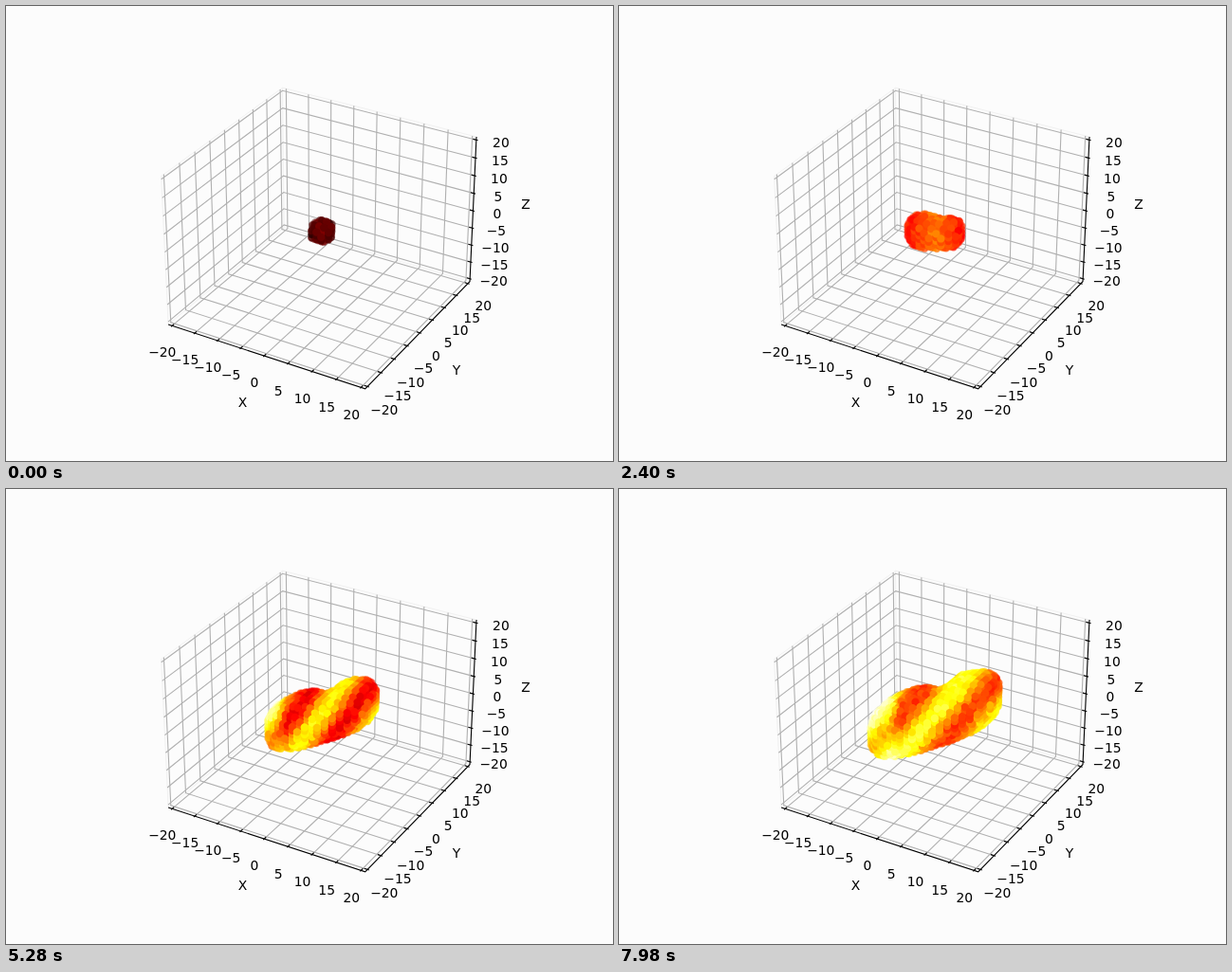
An HTML page with a canvas that plays this animation: 640 by 480 pixels, repeating every 8 s.

```html
<!DOCTYPE html>
<html lang="en">
<head>
<meta charset="utf-8">
<title>Pulsating voxel cloud</title>
<style>
  html, body { margin: 0; width: 100%; height: 100%; overflow: hidden; background: #fcfcfc; }
  svg, canvas { position: absolute; left: 0; top: 0; width: 640px; height: 480px; }
  text { font: 13.89px "DejaVu Sans", sans-serif; text-anchor: middle; }
</style>
</head>
<body>
<svg id="axes" viewBox="0 0 640 480"></svg>
<canvas id="cloud" width="640" height="480"></canvas>
<script>
const LOOP = 8000, STEP = 30, PULSE = 2430, EDGE = 125 / 6;
const CX = 333, CY = 237.4, FOCAL = 1997.8;

const mix = (a, b, u) => a + (b - a) * u;
const clamp = v => Math.max(0, Math.min(1, v));
const hash = (x, y, z) => {
  const s = Math.sin(x * 12.99 + y * 78.23 + z * 37.72) * 43758.55;
  return s - Math.floor(s);
};

// Perspective view: elevation 30, azimuth -60, box aspect 4:4:3
function project(x, y, z) {
  const X = x / 35, Y = y / 35, Z = z * 3 / 140;
  const c = Math.sqrt(3) / 2;
  const right = c * X + Y / 2;
  const up = -X / 4 + c / 2 * Y + c * Z;
  const near = c / 2 * X - 0.75 * Y + Z / 2;
  const k = FOCAL / (10 - near);
  return [CX + k * right, CY - k * up, near * FOCAL / 10];
}

function drawAxes() {
  const E = EDGE, IN = E - 0.67, OUT = E + 0.33, PAD = E + 3.4;
  const out = [];
  const line = (pts, color, width = 1.11) => {
    const d = pts.map(p => project(...p).slice(0, 2).map(v => v.toFixed(2)).join(",")).join(" ");
    out.push(`<polyline points="${d}" fill="none" stroke="${color}" stroke-width="${width}"/>`);
  };
  const text = (s, x, y) => out.push(`<text x="${x.toFixed(1)}" y="${Math.round(y)}">${s}</text>`);
  const label = (v, ...at) => {
    const [x, y] = project(...at);
    text(v < 0 ? "\u2212" + -v : v, x, y + 11.25);
  };
  const ticks = Array.from({ length: 9 }, (_, i) => i * 5 - 20);

  line([[-E, E, E], [E, E, E], [E, E, -E], [-E, E, -E], [-E, E, E], [-E, -E, E], [-E, -E, -E], [-E, E, -E]], "#f1f1f1", 1);
  for (const v of ticks) {
    line([[v, E, E], [v, E, -E], [v, -E, -E]], "#b0b0b0");
    line([[E, v, -E], [-E, v, -E], [-E, v, E]], "#b0b0b0");
    line([[-E, -E, v], [-E, E, v], [E, E, v]], "#b0b0b0");
  }
  line([[-E, -E, -E], [E, -E, -E], [E, E, -E], [E, E, E]], "#000");
  for (const v of ticks) {
    line([[v, -IN, -E], [v, -OUT, -E]], "#000");
    line([[IN, v, -E], [OUT, v, -E]], "#000");
    line([[IN, E, v], [OUT, E, v]], "#000");
    label(v, v, -PAD, -PAD);
    label(v, PAD, v, -PAD);
    label(v, PAD, PAD, v);
  }
  text("X", 249.5, 423);
  text("Y", 475, 389);
  text("Z", 548, 214);
  document.getElementById("axes").innerHTML = out.join("");
}

// Integer lattice, sorted back to front
const grid = [];
for (let x = -14; x <= 14; x++)
  for (let y = -14; y <= 14; y++)
    for (let z = -13; z <= 13; z++) {
      const [px, py, near] = project(x, y, z);
      if (Math.hypot(px - CX, py - CY, near) > 95) continue;
      grid.push({ px, py, near, tint: .09 * (hash(x, y, z) - .5) });
    }
grid.sort((a, b) => a.near - b.near);

function hot(v, alpha) {
  const ch = u => Math.round(255 * clamp(u));
  return `rgba(${ch(.0416 + v / .381)},${ch((v - .365) / .381)},${ch((v - .746) / .254)},${alpha.toFixed(3)})`;
}

// Swelling body: wide and rising first, then tall and falling, with a standing heat wave
function bodyAt(t) {
  const age = t / LOOP, phase = 2 * Math.PI * (t % PULSE) / PULSE;
  const swell = Math.sin(phase / 2), lean = Math.sin(phase);
  const born = clamp(t / 300), grow = .95 + .08 * age;
  return {
    rx: mix(12.5, (30 + 28 * swell + 15 * lean) * grow, born),
    ry: mix(12, (14 + 26 * Math.sqrt(swell) - 4 * lean) * grow, born),
    lean,
    notch: .28 * clamp(t / 3000),
    base: .4 + .22 * age - .33 * (1 - born),
    amp: (.13 + .1 * age) * Math.cos(phase - 1.07),
    wave: 2 * Math.PI / (44 + 34 * Math.max(0, -Math.cos(phase)))
  };
}

const ctx = document.getElementById("cloud").getContext("2d");
ctx.lineWidth = 2.08;

function drawCloud(t) {
  const b = bodyAt(t), rz = (b.rx + b.ry) / 2;
  const core = Math.max(0, 1 - 9 / b.ry) ** 3;
  const shown = grid.filter(p => {
    const x = p.px - CX, y = p.py - CY + .33 * b.lean * x;
    const ry = y < 0 ? b.ry * (1 - b.notch * Math.exp(-(((x - 8) / 14) ** 2))) : b.ry;
    const q = Math.abs(x / b.rx) ** 3 + Math.abs(y / ry) ** 3 + Math.abs(p.near / rz) ** 3;
    return q <= 1 && q >= core;
  });
  ctx.clearRect(0, 0, 640, 480);
  const far = shown[0].near, span = shown[shown.length - 1].near - far || 1;
  for (const { px, py, near, tint } of shown) {
    const x = px - CX, y = py - CY;
    const ripple = b.amp * Math.cos(b.wave * (.75 * x + .65 * b.lean * y));
    const rim = .2 * clamp((-x - 36) / 10);
    ctx.fillStyle = ctx.strokeStyle = hot(clamp(b.base + ripple + rim + tint), .3 + .7 * (near - far) / span);
    ctx.beginPath();
    ctx.arc(px, py, 3.1, 0, 2 * Math.PI);
    ctx.fill();
    ctx.stroke();
  }
}

let last = -1;
function tick() {
  const t = Math.floor(performance.now() % LOOP / STEP) * STEP;
  if (t !== last) drawCloud(last = t);
  requestAnimationFrame(tick);
}

drawAxes();
tick();
</script>
</body>
</html>
```
